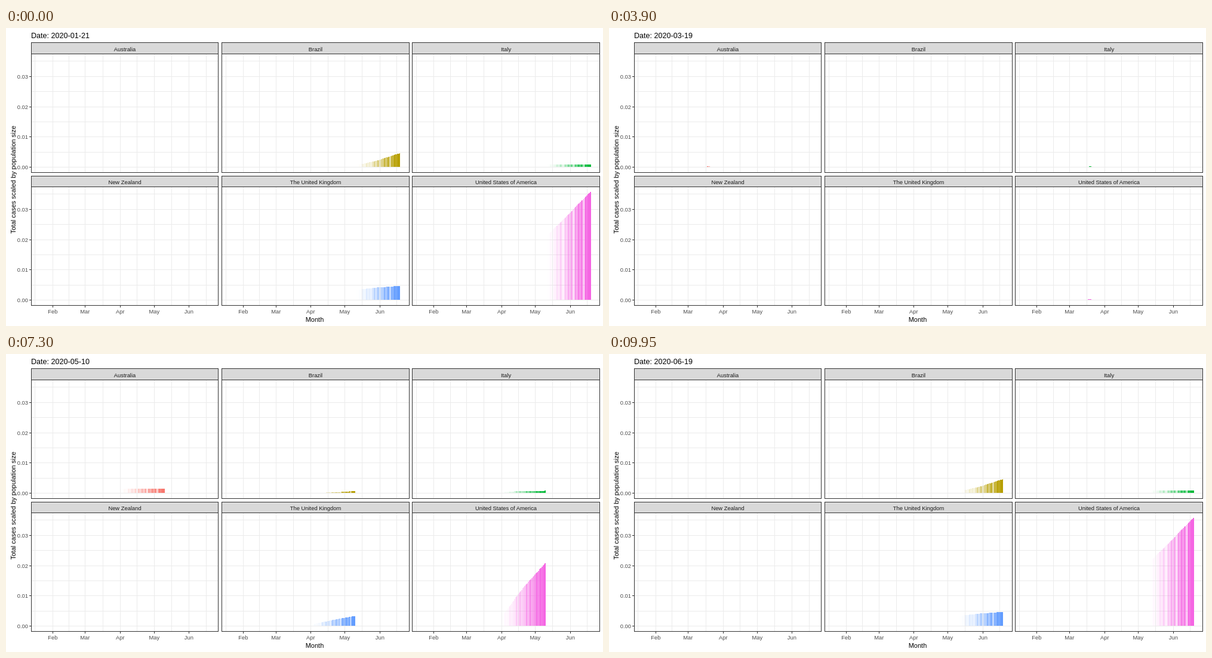
An HTML page for the animation above (10000 ms loop, 1000 by 500 pixels).

```html
<!DOCTYPE html>
<html lang="en">
<head>
<meta charset="utf-8">
<title>Total cases scaled by population size</title>
<style>
  html, body { margin: 0; width: 100%; height: 100%; overflow: hidden; background: #fff; }
  svg { display: block; width: 1000px; height: 500px; }
  text { font-family: "Liberation Sans", Arial, sans-serif; }
  rect, path { shape-rendering: crispEdges; }
</style>
</head>
<body>
<svg viewBox="0 0 1000 500">
  <g id="back"></g>
  <g id="bars"></g>
  <g id="front"></g>
  <text id="date" x="42" y="17" font-size="12.6"></text>
</svg>
<script>
const FRAMES = 200, STEP = 50, DAYS = 150, WAKE = 50;
const DAY_PX = 1.8887, BAR = 0.9, NUDGE = 0.11;
const START = Date.UTC(2020, 0, 21), DAY_MS = 864e5;
const MONTHS = [["Feb", 11], ["Mar", 40], ["Apr", 71], ["May", 101], ["Jun", 132]];
const MID_MONTHS = [-4.5, 25.5, 55.5, 86, 116.5, 147];

// curve: [day, bar height in px]; last: frame after which the bars are gone
const panels = [
  { name: "Australia", color: "#F8766D", last: 185,
    curve: [[56, 0], [58, 1], [65, 3], [70, 5], [75, 6.5], [90, 7.4], [150, 7.5]] },
  { name: "Brazil", color: "#B79F00",
    curve: [[80, 0], [86, .6], [98, 1.5], [110, 3.2], [117, 5], [130, 10.5], [150, 23]] },
  { name: "Italy", color: "#00BA38",
    curve: [[54, 0], [58, .6], [75, 2], [90, 3], [110, 3.5], [150, 4.2]] },
  { name: "New Zealand", color: "#00BFC4", curve: [[0, 0], [150, .3]] },
  { name: "The United Kingdom", color: "#619CFF",
    curve: [[60, 0], [65, .6], [75, 3.3], [90, 9.4], [110, 16.4], [130, 20.5], [150, 23.3]] },
  { name: "United States of America", color: "#F564E3",
    curve: [[55, 0], [59, 1], [63, 3], [68.5, 9.5], [74.5, 23], [90, 63], [110, 105], [130, 142], [150, 181.2]] }
];
const LEFT = [42, 361, 680], RIGHT = [355, 675, 994];
const ROWS = [{ top: 24, strip: 43, bottom: 242, zero: 233 },
              { top: 248, strip: 266, bottom: 465, zero: 456 }];

const $ = id => document.getElementById(id);
const dayX = (col, day) => 57.45 + 319.25 * col + day * DAY_PX;
const rect = (x, y, w, h, fill, more = "") =>
  `<rect x="${x}" y="${y}" width="${w}" height="${h}" fill="${fill}" ${more}/>`;
const text = (x, y, size, fill, str, anchor = "middle", more = "") =>
  `<text x="${x}" y="${y}" font-size="${size}" fill="${fill}" text-anchor="${anchor}" ${more}>${str}</text>`;

function box(x0, y0, x1, y1, fill) {
  return rect(x0 + .5, y0 + .5, x1 - x0, y1 - y0, fill, 'stroke="#333"');
}

function drawPlot() {
  let back = "", front = "";
  panels.forEach((p, i) => {
    const col = i % 3, r = ROWS[i / 3 | 0], x0 = LEFT[col], x1 = RIGHT[col];
    for (let k = 0; k < 8; k++)
      back += rect(x0, Math.floor(r.zero + .4 - k * 25.35), x1 - x0, 1, "#ebebeb");
    for (const d of [...MONTHS.map(m => m[1]), ...MID_MONTHS])
      back += rect(Math.floor(dayX(col, d)), r.strip, 1, r.bottom - r.strip, "#ebebeb");

    front += box(x0, r.strip, x1, r.bottom, "none") + box(x0, r.top, x1, r.strip, "#d9d9d9");
    front += text((x0 + x1 + 1) / 2, r.strip - 4.5, 9.4, "#1a1a1a", p.name);
    if (col === 0) for (let k = 0; k < 4; k++) {
      const y = Math.floor(r.zero + .4 - k * 50.7);
      front += rect(39, y, 3, 1, "#333") + text(37, y + 4, 9.4, "#4d4d4d", "0.0" + k, "end");
    }
    if (i > 2) for (const [name, d] of MONTHS) {
      const x = Math.floor(dayX(col, d));
      front += rect(x, 466, 1, 3, "#333") + text(x + .3, 479, 9.4, "#4d4d4d", name);
    }
  });
  front += text(517, 493, 11, "#000", "Month");
  front += text(0, 0, 11, "#000", "Total cases scaled by population size", "middle",
    'transform="translate(15.5 254.5) rotate(-90)"');
  $("back").innerHTML = back;
  $("front").innerHTML = front;
}

// Each day lands on a whole frame; frames between two days are interpolated.
const keyFrame = day => Math.round(day * (FRAMES - 1) / DAYS);
function dayAt(frame) {
  let d = 0;
  while (d < DAYS && keyFrame(d + 1) <= frame) d++;
  const a = keyFrame(d);
  return d + (frame - a) / (keyFrame(d + 1) - a);
}

function heightAt(curve, day) {
  if (day <= curve[0][0]) return curve[0][1];
  const i = curve.findIndex(p => p[0] >= day);
  if (i < 0) return curve[curve.length - 1][1];
  const [d0, h0] = curve[i - 1], [d1, h1] = curve[i];
  return h0 + (h1 - h0) * (day - d0) / (d1 - d0);
}

function barsAt(frame) {
  let out = "";
  panels.forEach((p, i) => {
    if (frame > (p.last || FRAMES)) return;
    const zero = ROWS[i / 3 | 0].zero;
    for (let age = Math.min(WAKE, frame); age >= 0; age--) {
      const day = dayAt(frame - age), h = Math.round(heightAt(p.curve, day));
      if (!h) continue;
      const x = dayX(i % 3, day) + NUDGE, half = BAR * DAY_PX / 2;
      const l = Math.floor(x - half), w = Math.floor(x + half) - l;
      const alpha = (1 - age / (WAKE + 1)) ** 1.5;
      out += rect(l, zero - h, w, h, p.color, `fill-opacity="${alpha.toFixed(3)}"`);
    }
  });
  return out;
}

let shown = -1;
function update(ms) {
  const frame = Math.floor(ms / STEP) % FRAMES;
  if (frame === shown) return;
  shown = frame;
  const day = Math.floor(frame * DAYS / (FRAMES - 1));
  $("date").textContent = "Date: " + new Date(START + day * DAY_MS).toISOString().slice(0, 10);
  // the finished bars stay for the first step of the next round
  $("bars").innerHTML = barsAt(frame || FRAMES - 1);
}

drawPlot();
update(0);
const begin = performance.now();
(function loop() {
  update(performance.now() - begin);
  requestAnimationFrame(loop);
})();
</script>
</body>
</html>
```
